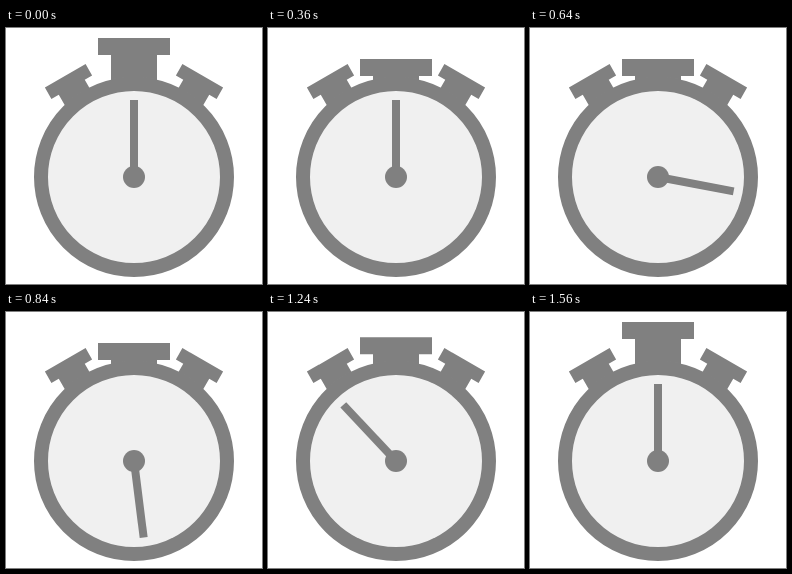
These frames come from a looping animation (256x256 px, 1600 ms). An HTML page:

```html
<!DOCTYPE html>
<html lang="en">
<head>
<meta charset="utf-8">
<title>Stopwatch</title>
<style>
  html, body { margin: 0; width: 100%; height: 100%; overflow: hidden; background: #fff; }
  svg { display: block; width: 100vw; height: 100vh; }
</style>
</head>
<body>
<svg viewBox="0 0 256 256" fill="#808080">
  <defs>
    <path id="knob" d="M-23.5-6.5h47v13h-8.5v24h-30v-24h-8.5z"/>
  </defs>
  <use href="#knob" transform="translate(62.5 53.5) rotate(-30)"/>
  <use href="#knob" transform="translate(193.5 53.5) rotate(30)"/>
  <path id="button" d="M92 10h72v17h-13v33h-46v-33h-13z"/>
  <circle cx="128" cy="149" r="93" fill="#f0f0f0" stroke="#808080" stroke-width="14"/>
  <path id="hand" d="M124 72h8v77h-8z"/>
  <circle cx="128" cy="149" r="11"/>
</svg>
<script>
  const STEP = 40, STEPS = 40, PRESS = 21;
  const button = document.getElementById('button');
  const hand = document.getElementById('hand');
  const progress = (step, from, to) => Math.min(1, Math.max(0, (step - from) / (to - from)));

  function draw() {
    const step = Math.floor(performance.now() / STEP) % STEPS;
    const drop = PRESS * (progress(step, 0, 9) - progress(step, 28, 39));
    const angle = 360 * progress(step, 9, 34);
    button.setAttribute('transform', `translate(0 ${drop})`);
    hand.setAttribute('transform', `rotate(${angle} 128 149)`);
    requestAnimationFrame(draw);
  }
  draw();
</script>
</body>
</html>
```
